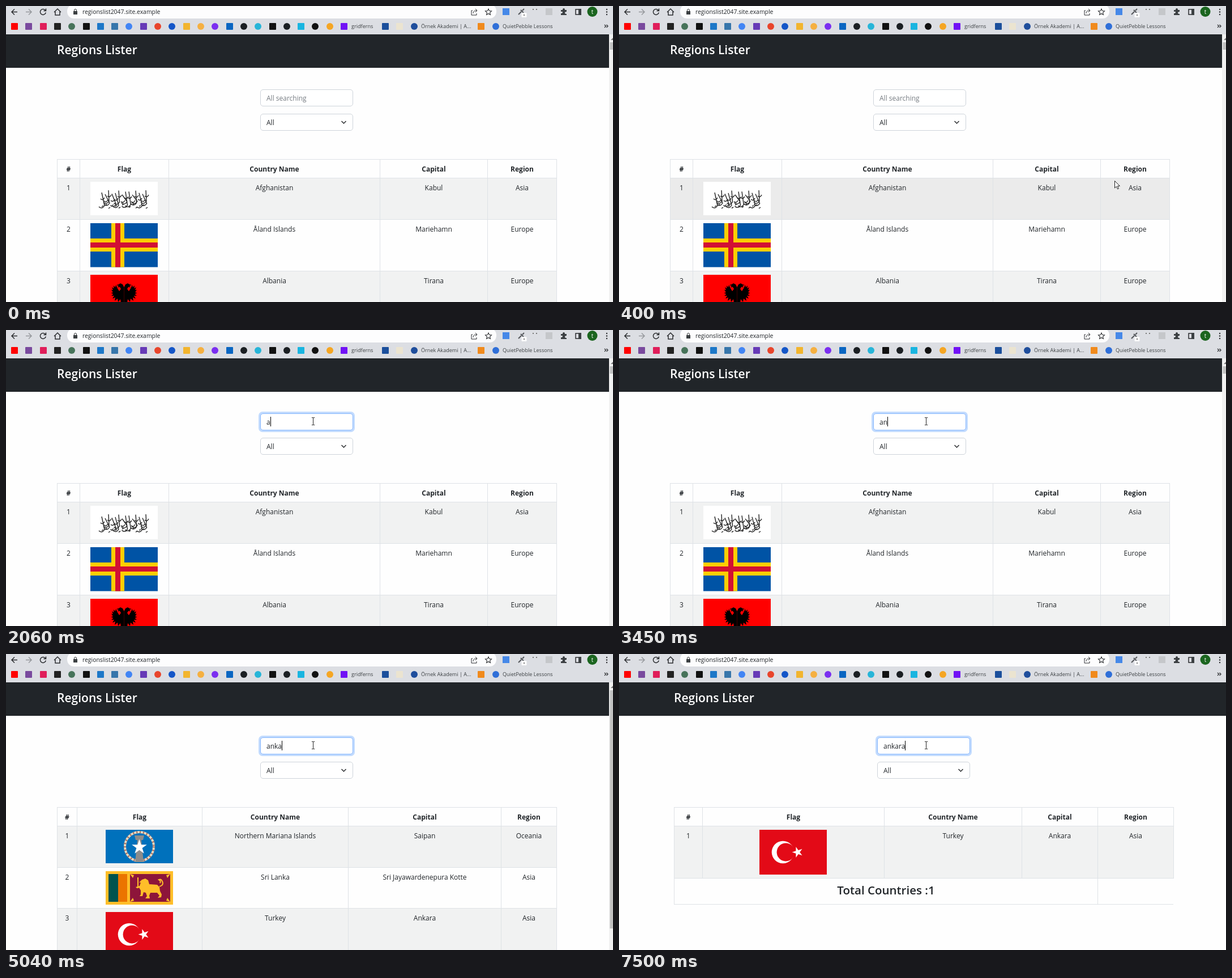
Animation of 1072 by 522 pixels, one loop 8000 ms. Source, as an HTML page:

```html
<!DOCTYPE html>
<html lang="en">
<head>
<meta charset="utf-8">
<title>Regions Lister</title>
<style>
  html, body { margin: 0; width: 100%; height: 100%; overflow: hidden; background: #fefefe; }
  svg { display: block; width: 100%; height: 100%; }
  text { font: 12px "Open Sans", "Noto Sans", sans-serif; fill: #212529; white-space: pre; }
  .mid { text-anchor: middle; }
  .bold { font-weight: 700; }
  .big { font-size: 20.5px; font-weight: 600; }
  .small { font-size: 9.1px; fill: #3c4043; }
  .line { fill: none; stroke: #dee2e6; }
  .icon { fill: none; stroke: #2b2d30; stroke-width: 1.5; }
</style>
</head>
<body>
<svg viewBox="0 0 1072 522">
  <defs>
    <g id="afghanistan"></g>
    <g id="aland">
      <path fill="#0053a5" d="M0 0h119v77.500H0z"/>
      <path fill="#ffce00" d="M37 0h23v77.500H37zM0 27h119v23H0z"/>
      <path fill="#d21034" d="M44 0h9v77.500h-9zM0 34h119v9H0z"/>
    </g>
    <g id="albania">
      <path fill="#f00" d="M0 0h119v85H0z"/>
      <path id="wing" d="M59.500 22L62 17 66 15 69 17 73 18 69 19.500 71 22 67 21.500 65 25 68 29 71 24 74 18 75 22 78 19 77.500 24 81 22 79 27 82 26.500 79 31 82.500 32 78.500 34 82 37 77 37 80 42 75 40 76 46 71 42 70 48 66 43 65 50 70 56 64 56 62 62 59.500 68z"/>
      <use href="#wing" transform="translate(119) scale(-1 1)"/>
    </g>
    <g id="mariana"></g>
    <g id="lanka">
      <path fill="#ffbe29" d="M0 0h119v59H0z"/>
      <path fill="#00534e" d="M5 5h17v49H5z"/>
      <path fill="#eb7400" d="M22 5h16v49H22z"/>
      <path fill="#8d153a" d="M43 5h71v49H43z"/>
      <path fill="#ffbe29" d="M43 5l7 2-2 5zM114 5l-7 2 2 5zM43 54l7-2-2-5zM114 54l-7-2 2-5z"/>
      <path fill="#ffbe29" d="M64 15l6-2 5 3 2 7 14 1 4 4 1 7 3 6-1 5-6 1 3-4-4-5-12 0-2 5 1 5-8 0 3-4-2-6-4-1-2 7-5 0 2-3 0-7-3-5-4 1-2-2 7-2 2-6-3 0z"/>
      <path fill="none" stroke="#ffbe29" stroke-width="2" d="M95 27q8-2 5-9-2-5-6-3 4 2 2 6M57 30V11"/>
    </g>
    <g id="turkey"></g>
  </defs>

  <path fill="#fefefe" d="M0 0h1072v522H0z"/>
  <g id="tables"></g>
  <g id="page">
    <path fill="#212529" d="M-10 50h1090v59H-10z"/>
    <text class="big" x="90" y="85" style="fill:#fff;font-size:21px">Regions Lister</text>
    <rect id="ring" x="446" y="144" width="170" height="36" rx="7" fill="#c2dbfe"/>
    <rect id="field" x="449.500" y="147.500" width="163" height="29" rx="4.500" fill="#fff"/>
    <rect x="449.500" y="190.500" width="163" height="29" rx="4.500" fill="#fff" stroke="#ced4da"/>
    <text id="hint" x="460" y="167" style="fill:#757b81">All searching</text>
    <text id="typed" x="460" y="167"></text>
    <rect id="caret" y="153" width="1" height="17"/>
    <text x="460" y="210">All</text>
    <path class="icon" d="M592.500 203l4 4 4-4"/>
  </g>
  <g id="scroll">
    <path fill="#f1f1f1" d="M1065 50h7v472h-7z"/>
    <path fill="#777" d="M1068 60l4-4v4z"/>
    <rect id="thumb" x="1066.500" y="64" width="6" fill="#c1c1c1"/>
  </g>

  <path fill="#dcdee3" d="M0 0h1072v50H0z"/>
  <rect x="108" y="-3" width="758" height="25" rx="12" fill="#fdfdfe"/>
  <g class="icon">
    <path d="M20 10.500H10m5-5l-5 5 5 5"/>
    <path stroke="#96999d" d="M35 10.500h10m-5-5l5 5-5 5"/>
    <path d="M69.500 7.500a5 5 0 1 0 .8 4M70.500 4.500v4h-4"/>
    <path d="M85 11l6-6 6 6M87 10v6h8v-6"/>
    <path stroke-width="1" d="M824 8h-2v8h9v-3M825 13q0-5 6-5m-2-3l3 3-3 3"/>
    <path stroke-width="1.100" d="M852 5l1.600 3.600 3.900.4-2.900 2.600.8 3.900-3.400-2-3.400 2 .8-3.900-2.900-2.600 3.900-.4z"/>
    <path d="M1006 6h9v9h-9z"/>
    <path stroke-width="1" d="M120.500 9V7.500a2 2 0 0 1 4 0V9"/>
    <path stroke="#55585c" stroke-width="2" d="M905 15l5-5m-1-3l5 5m-2-4l3-3"/>
    <path stroke-width="1.300" d="M1057 33l2.500 2.500-2.500 2.500m3.500-5l2.500 2.500-2.500 2.500"/>
  </g>
  <path fill="#3c4043" d="M119 9h7v6h-7zM1011 5h5v11h-5zM980 7h3q0-3 2-3t2 3h3v3q-3 0-3 2t3 2v2h-10v-3q3 0 3-2t-3-1z"/>
  <rect x="910.500" y="12" width="9" height="8" rx="1.500" fill="#fff"/>
  <path fill="#777" d="M914 15h2v2h-2zM930 5h2v2h-2zM936 5h2v2h-2z"/>
  <rect x="877" y="4" width="12" height="12" fill="#4688e8"/>
  <rect x="953" y="4" width="12" height="12" fill="#c5c7ca"/>
  <circle cx="1035.500" cy="10" r="9" fill="#1b651f"/>
  <text class="small mid" x="1035.500" y="13.500" style="fill:#fff;font-size:10px">t</text>
  <g fill="#2b2d30"><circle cx="1061" cy="6" r="1.200"/><circle cx="1061" cy="10.500" r="1.200"/><circle cx="1061" cy="15" r="1.200"/></g>
  <text x="135" y="14" style="font-size:10.400px">regionslist2047.site.example</text>
  <g id="marks"></g>
  <text class="small" x="610" y="39">gridferns</text>
  <text class="small" x="733" y="39">Örnek Akademi | A...</text>
  <text class="small" x="877" y="39">QuietPebble Lessons</text>

  <path id="arrow" d="M.5.500v12.500l3-2.800 2 4.600 2-.9-2-4.500h4z" fill="#fff" stroke="#222"/>
  <path id="beam" d="M-2.500-6.500h2l.5.500.5-.5h2M0-6V6M-2.500 6.500h2l.500-.5.500.5h2" fill="none" stroke="#222"/>
</svg>
<script>
const $ = id => document.getElementById(id);
const show = (id, on) => $(id).setAttribute('visibility', on ? 'visible' : 'hidden');
const lastAt = (steps, t) => steps.filter(s => s[0] <= t).pop();
const text = (s, x, y, cls = '') => `<text class="mid ${cls}" x="${x}" y="${y}">${s}</text>`;

function star(cx, cy, r, turn) {
  const pts = Array.from({ length: 10 }, (_, i) => {
    const a = turn + i * Math.PI / 5, d = i % 2 ? r * 0.382 : r;
    return `${cx + d * Math.cos(a)},${cy + d * Math.sin(a)}`;
  });
  return `<polygon fill="#fff" points="${pts.join(' ')}"/>`;
}

// Flags built from rules
let strokes = '';
for (let i = 0; i < 14; i++) {
  const x = 20 + i * 6, wave = Math.sin(i * 2.3);
  const top = 19 + 4 * wave, foot = 38 + 4 * Math.cos(i * 1.7);
  strokes += `M${x} ${top}L${x + 5 + 4 * wave} ${foot}q-4 7-10 2`;
  strokes += `M${x - 2} ${30 + 5 * wave}q4 4 7-2M${x} ${44 - 3 * wave}l3-2`;
}
$('afghanistan').innerHTML = `<path fill="#fff" d="M0 0h119v59H0z"/>
  <path fill="none" stroke="#222" stroke-width="1.400" d="${strokes}"/>`;
$('mariana').innerHTML = `<path fill="#0071bc" d="M0 0h119v59H0z"/>
  <g fill="none" stroke-width="4"><circle cx="59.500" cy="29.500" r="25.500" stroke="#e4d9c2"/>
  <circle cx="59.500" cy="29.500" r="25.500" stroke="#a46b60" stroke-dasharray="2 4"/></g>
  <path fill="#8c8c8c" d="M51 10h17l-2 8h-3l4 39H52l4-39h-3z"/>` + star(59.5, 30.5, 14, -Math.PI / 2);
$('turkey').innerHTML = `<path fill="#e30a17" d="M0 0h119v79H0z"/>
  <circle cx="41.500" cy="39.500" r="19.800" fill="#fff"/>
  <circle cx="46.500" cy="39.500" r="15.900" fill="#e30a17"/>` + star(67.5, 39.5, 9.9, Math.PI);

// Bookmarks: x, colour, shape
const marks = `15 #f00 s,40 #7a4a9e s,66 #e01e5a s,91 #222 s,116 #47735a c,142 #111 s,167 #1d78c8 s,
192 #3776ab s,217 #4285f4 c,243 #673ab7 s,268 #e8452c c,293 #1456c8 c,319 #f2b52e s,344 #f5b041 c,
369 #7b2ff0 c,395 #0a66c2 s,420 #1b1f23 c,445 #27b5d8 c,471 #111 s,496 #1b1f23 c,521 #19b5e0 s,
546 #111 c,572 #f5a623 c,597 #7111f5 s,670 #1b4f9c s,695 #ebe4d0 s,721 #1f4e9c c,839 #f08a1c s,865 #2f6fd8 c`;
$('marks').innerHTML = marks.split(',').map(m => {
  const [x, fill, kind] = m.trim().split(' ');
  return `<rect x="${x - 6}" y="30" width="12" height="12" rx="${kind == 'c' ? 6 : 1}" fill="${fill}"/>`;
}).join('');

const HEADS = ['#', 'Flag', 'Country Name', 'Capital', 'Region'];
const views = [
  { from: 0, thumb: 13, cols: [90, 130, 287, 660, 850, 972], ys: [303, 376, 467, 566],
    rows: ['afghanistan|Afghanistan|Kabul|Asia', 'aland|Åland Islands|Mariehamn|Europe', 'albania|Albania|Tirana|Europe'] },
  { from: 3520, thumb: 420, cols: [90, 125, 346, 604, 874, 972], ys: [303, 376, 448, 540],
    rows: ['mariana|Northern Mariana Islands|Saipan|Oceania', 'lanka|Sri Lanka|Sri Jayawardenepura Kotte|Asia', 'turkey|Turkey|Ankara|Asia'] },
  { from: 5590, thumb: 0, cols: [97, 147, 468, 711, 845, 979], ys: [303, 395], total: 441,
    rows: ['turkey|Turkey|Ankara|Asia'] }
];

function table({ cols, ys, rows, total }, n) {
  const left = cols[0], width = cols[5] - left, end = ys[ys.length - 1];
  const mid = i => (cols[i] + cols[i + 1]) / 2 + 0.5;
  let out = HEADS.map((h, i) => text(h, mid(i), 292, 'bold')).join('');
  rows.forEach((row, r) => {
    const [flag, ...cells] = row.split('|'), y = ys[r];
    out += `<rect id="row${n}${r}" x="${left}" y="${y}" width="${width}" height="${ys[r + 1] - y}" fill="${r % 2 ? '#fefefe' : '#f1f2f2'}"/>
      <use href="#${flag}" x="${Math.floor(mid(1) - 59.5)}" y="${y + 7}"/>` + text(r + 1, mid(0), y + 22);
    out += cells.map((c, i) => text(c, mid(i + 2), y + 22)).join('');
  });
  let d = cols.map(x => `M${x + 0.5} 270V${end + 1}`).join('');
  d += [270, ...ys].map(y => `M${left} ${y + 0.5}h${width + 1}`).join('');
  if (total) {
    d += `M${left} ${total + 0.5}h${width}M${left + 0.5} ${end}V${total}M${cols[4] + 0.5} ${end}V${total}`;
    out += text('Total Countries :1', (left + cols[4]) / 2 + 0.5, 424, 'big');
  }
  return `<g id="table${n}">${out}<path class="line" d="${d}"/></g>`;
}
$('tables').innerHTML = views.map(table).join('');

// Pointer stops: time, x, y
const path = [[130, 1033, 508], [200, 1004, 460], [260, 967, 409], [330, 922, 357], [400, 875, 308],
  [470, 812, 264], [530, 746, 230], [600, 682, 205], [670, 626, 185], [730, 583, 172], [800, 555, 164], [870, 542, 161]];
const keys = [[1020, 0], [2060, 1], [2390, 2], [3520, 3], [4530, 4], [5590, 5], [7500, 6]];
const BLINK = 525;

function drawPointer(t) {
  const [, x, y] = lastAt(path, t) || [0, -50, -50];
  const inField = x > 449 && x < 613 && y > 147 && y < 177;
  show('arrow', !inField);
  show('beam', inField);
  $('arrow').setAttribute('transform', `translate(${x} ${y})`);
  $('beam').setAttribute('transform', `translate(${x + 0.5} ${y})`);
  const { ys } = views[0];
  for (let r = 0; r < 3; r++) {
    const over = x >= 90 && x < 973 && y >= ys[r] && y < ys[r + 1];
    $('row0' + r).setAttribute('fill', over ? '#ebebeb' : r % 2 ? '#fefefe' : '#f1f2f2');
  }
}

function drawField(t) {
  const key = lastAt(keys, t), count = key ? key[1] : 0;
  $('typed').textContent = 'ankara'.slice(0, count);
  show('hint', !count);
  show('caret', key && (t - key[0]) % (2 * BLINK) < BLINK);
  $('caret').setAttribute('x', Math.round(460 + (count ? $('typed').getComputedTextLength() : 0)));
  $('ring').setAttribute('opacity', t < 1020 ? 0 : t < 1070 ? 0.5 : 1);
  $('field').setAttribute('stroke', t < 1020 ? '#ced4da' : t < 1070 ? '#aac6ec' : '#86b7fe');
}

function draw(t) {
  const view = views.filter(v => v.from <= t).pop(), n = views.indexOf(view);
  views.forEach((_, i) => show('table' + i, i === n));
  $('page').setAttribute('transform', `translate(${n === 2 ? 7 : 0} 0)`);
  show('scroll', n < 2);
  $('thumb').setAttribute('height', view.thumb);
  drawField(t);
  drawPointer(t);
}

const start = performance.now();
function tick() {
  draw((performance.now() - start) % 8000);
  requestAnimationFrame(tick);
}
tick();
</script>
</body>
</html>
```
